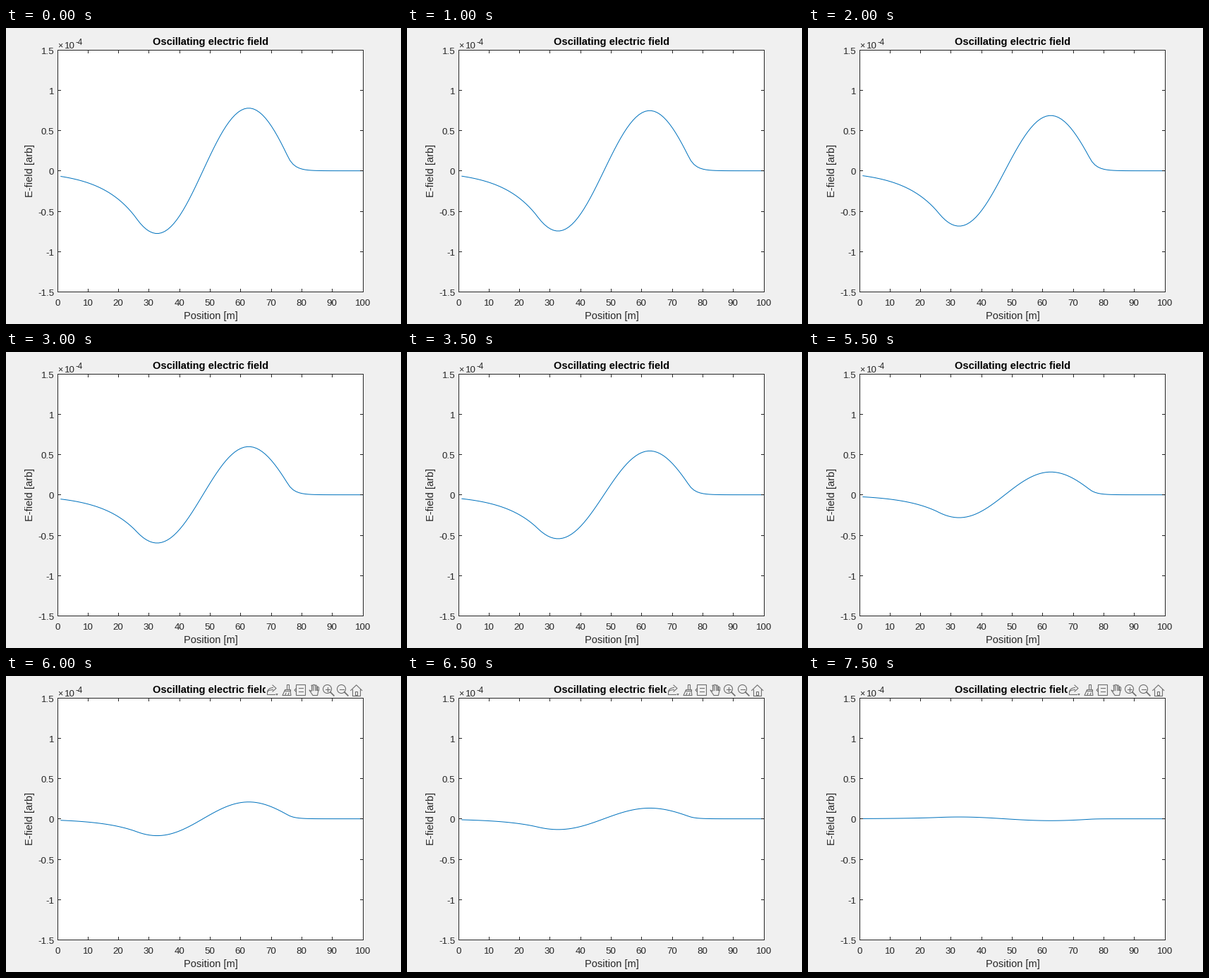
Recreate the animation shown at these times as a matplotlib script. Size 560 by 420 pixels, loop 8 s.

```python
import numpy as np
import matplotlib.pyplot as plt
from matplotlib.animation import FuncAnimation
from matplotlib.patches import Arc, Circle, Rectangle, RegularPolygon

W, H, DPI = 560, 420, 80
FRAMES, INTERVAL = 16, 500
LEFT, RIGHT, TOP, BOTTOM = 73, 506, 31, 374    # pixel columns and rows
UNIT = (BOTTOM - TOP) / 3                      # pixels per 1e-4 of field
ZERO = 202.65
PEAK = 0.782
TOOLBAR_FROM = 12
BG, INK, BLUE, ICON = "#f0f0f0", "#262626", "#0072bd", "#6e6e6e"

plt.rcParams["font.family"] = "Liberation Sans"
fig = plt.figure(figsize=(W / DPI, H / DPI), dpi=DPI, facecolor=BG)
ax = fig.add_axes([0, 0, 1, 1])
ax.set_xlim(0, W)
ax.set_ylim(H, 0)
ax.axis("off")


def pt(px):
    return px * 72 / DPI


def line(xs, ys, color=INK, width=1.0, z=3):
    return ax.plot(xs, ys, color=color, lw=pt(width), zorder=z,
                   solid_joinstyle="round")[0]


def label(x, y, s, size=13.33, ha="center", va="baseline", color=INK, **kw):
    return ax.text(x, y, s, fontsize=pt(size), ha=ha, va=va, color=color,
                   zorder=4, **kw)


def draw_axes():
    ax.add_patch(Rectangle((LEFT, TOP), RIGHT - LEFT, BOTTOM - TOP,
                           fc="white", ec=INK, lw=pt(1), zorder=1))
    for v in range(0, 101, 10):
        x = np.floor(LEFT + (RIGHT - LEFT) * v / 100)
        line([x, x], [BOTTOM, BOTTOM - 4])
        line([x, x], [TOP, TOP + 4])
        label(x, 393.6, str(v))
    for v in np.arange(-1.5, 1.6, 0.5):
        y = np.floor(ZERO + 0.2 - UNIT * v)
        line([LEFT, LEFT + 4], [y, y])
        line([RIGHT, RIGHT - 4], [y, y])
        label(68.3, y + 5.7, f"{v:g}", ha="right")
    label(290, 24, "Oscillating electric field", 14.67, color="black",
          weight="bold")
    label(290, 413, "Position [m]", 14.67)
    label(40.6, 202, "E-field [arb]", 14.67, ha="right", va="center",
          rotation=90)
    label(73.5, 28.7, "×", 12.5, ha="left")
    label(83.3, 28.7, "10", ha="left")
    label(98.8, 23.6, "-4", 11.5, ha="left")


def draw_toolbar():
    """Build the hover toolbar and return its artists."""
    parts = [ax.add_patch(Rectangle((367.5, 10), 138.5, 20, fc=BG,
                                    ec="none", zorder=5))]
    pen = dict(fc="none", ec=ICON, lw=pt(1.1), zorder=6)

    def add(patch):
        parts.append(ax.add_patch(patch))

    def box(x, y, w, h):
        add(Rectangle((x, y), w, h, **pen))

    def path(*points, width=1.1):
        parts.append(line(*zip(*points), ICON, width, 6))

    def share(x):
        add(Arc((x + 2, 23), 17, 13, theta1=180, theta2=270, **pen))
        add(Arc((x + 2, 23), 17, 7, theta1=180, theta2=270, **pen))
        path((x + 1, 13), (x + 6, 17.5), (x + 1, 22))
        path((x - 7.5, 23), (x - 7.5, 26), (x + 4, 26))
        add(RegularPolygon((x + 7, 26), 3, radius=2, fc=ICON, zorder=6))

    def brush(x):
        box(x, 12, 3, 7)
        box(x - 3, 19, 8, 2)
        path((x - 3, 21), (x - 6, 27.5), (x + 6, 27.5), (x + 5, 21))
        for dx in (-2, 2):
            path((x + dx, 27), (x + dx + 1, 24))

    def data_tip(x):
        box(x - 6, 12, 13, 15)
        for y in (17, 22):
            path((x - 2, y), (x + 4, y))
        path((x - 6, 18), (x - 8, 20), (x - 6, 22))

    def hand(x):
        for i in range(4):
            fx, top = x - 3 + 2.6 * i, 13.5 + 0.7 * (i - 1) ** 2
            add(Arc((fx, top), 2.4, 2.4, theta1=180, theta2=360, **pen))
            for side in (-1.2, 1.2):
                path((fx + side, top), (fx + side, 19.5))
        path((x - 4, 21.5), (x - 7, 20), (x - 2, 27.5), (x + 4.5, 27.5),
             (x + 6, 20))

    def zoom(x, plus):
        add(Circle((x, 18.5), 6, **pen))
        path((x + 4.3, 22.8), (x + 9.3, 27.8), width=1.7)
        path((x - 3, 18.5), (x + 3, 18.5))
        if plus:
            path((x, 15.5), (x, 21.5))

    def home(x):
        path((x - 8, 20.5), (x, 12.8), (x + 8, 20.5))
        path((x - 5.5, 18.5), (x - 5.5, 27.5), (x + 5.5, 27.5),
             (x + 5.5, 18.5))
        box(x - 2, 22, 3, 5)

    share(377)
    brush(398)
    data_tip(417)
    hand(437)
    zoom(455.5, True)
    zoom(475.5, False)
    home(496.7)
    return parts


def mode_profile(x):
    """Guided mode: sine inside the slab, exponential tails outside."""
    lo, hi = 25.5, 75.5
    core = np.sin(np.pi / 30 * (np.clip(x, lo, hi) - 47.5))
    left = np.exp(0.0866 * np.minimum(x - lo, 0))
    right = np.exp(-0.45 * np.maximum(x - hi, 0))
    return core * left * right


draw_axes()
pos = np.arange(1, 101)
profile = PEAK * UNIT * mode_profile(pos)
curve = line(LEFT + 0.5 + (RIGHT - LEFT) * pos / 100, ZERO - profile, BLUE,
             z=2)
toolbar = draw_toolbar()


def update(i):
    curve.set_ydata(ZERO - profile * np.cos(0.1 * (i + 1)))
    for part in toolbar:
        part.set_visible(i >= TOOLBAR_FROM)
    return [curve, *toolbar]


anim = FuncAnimation(fig, update, frames=FRAMES, interval=INTERVAL,
                     repeat=True, repeat_delay=0, blit=False)
plt.show()
```
